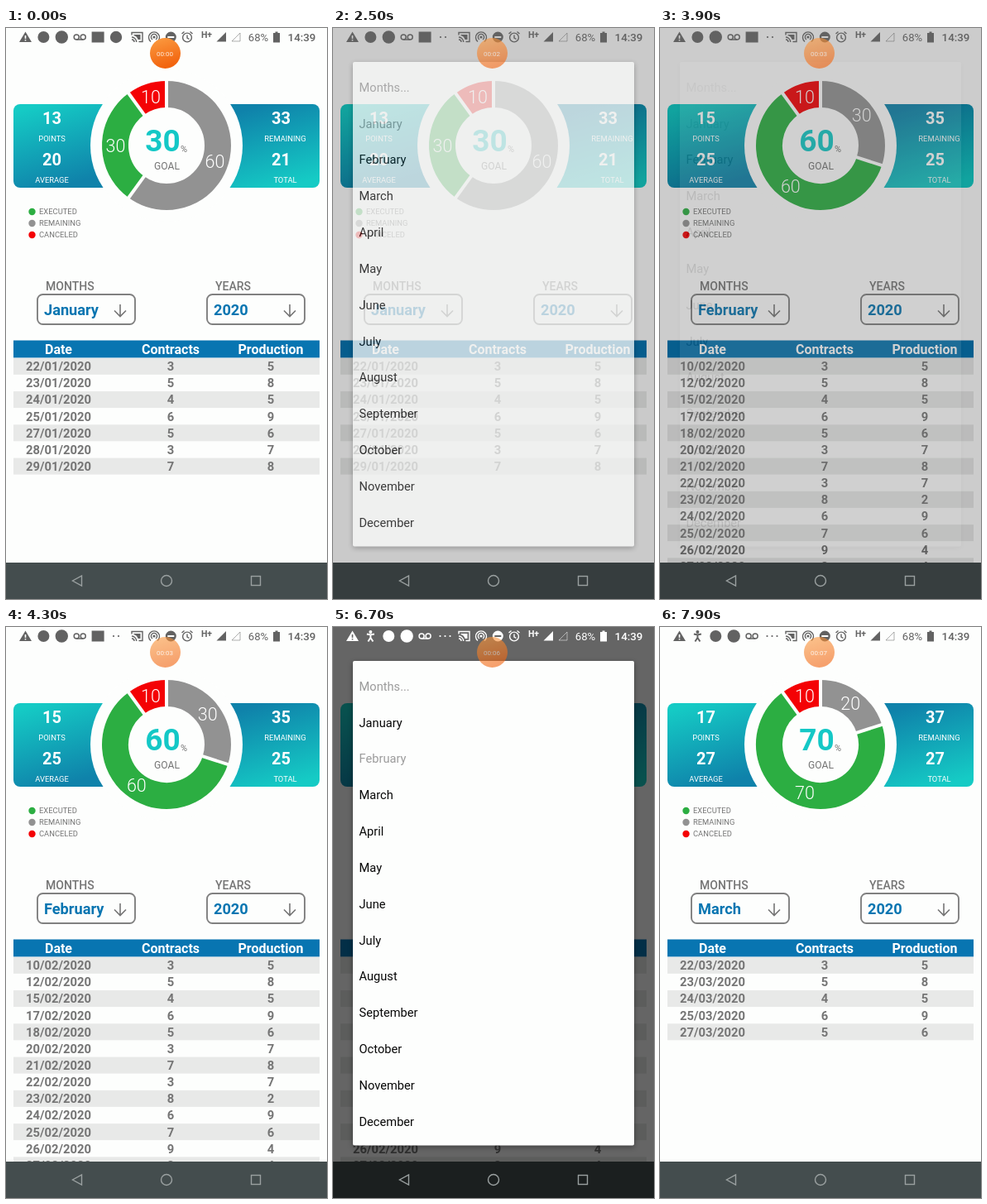
An HTML page for the animation above (8 s loop, 388x690 px).

```html
<!DOCTYPE html>
<html lang="en">
<head>
<meta charset="utf-8">
<title>Goal dashboard</title>
<style>
html, body { margin: 0; height: 100%; overflow: hidden; background: #fdfefd; }
svg { display: block; width: 388px; height: 690px; font-family: Roboto, sans-serif; }
#dialog > rect { filter: drop-shadow(0 2px 3px rgba(0,0,0,.35)); }
</style>
</head>
<body>
<svg id="stage" viewBox="0 0 388 690">
  <defs>
    <linearGradient id="gl" x1="0.1" y1="0" x2="0.45" y2="1">
      <stop offset="0.05" stop-color="#15cbc5"/><stop offset="1" stop-color="#0f82aa"/>
    </linearGradient>
    <linearGradient id="gr" x1="0.45" y1="0" x2="0.8" y2="1">
      <stop offset="0" stop-color="#0f82aa"/><stop offset="0.95" stop-color="#15cbc5"/>
    </linearGradient>
    <linearGradient id="gb" x1="0" y1="0" x2="0.3" y2="1">
      <stop offset="0" stop-color="#fb9d42"/><stop offset="1" stop-color="#f2640f"/>
    </linearGradient>
  </defs>
  <rect width="388" height="690" fill="#fdfefd"/>
  <g id="app"></g>
  <rect y="646" width="388" height="44" fill="#444d4e"/>
  <rect id="dim" width="388" height="690"/>
  <g fill="none" stroke="#9aa0a0" stroke-width="1.4">
    <path d="M91.5 662V674L80.5 668Z"/>
    <circle cx="194" cy="668" r="6.5"/>
    <rect x="296.5" y="662.5" width="11" height="11"/>
  </g>
  <g id="dialog"></g>
  <g id="status"><g id="notes"></g><g id="system"></g></g>
  <g id="bubble">
    <circle cx="192.5" cy="30.5" r="18.5" fill="url(#gb)"/>
    <text id="clock" x="192" y="33.6" font-size="8" fill="#fff" fill-opacity=".85" text-anchor="middle"></text>
  </g>
</svg>
<script>
const LOOP = 8000;
const GRAY = '#757575', BLUE = '#0875b1', TEAL = '#14c8c6';
const NAMES = ['January', 'February', 'March', 'April', 'May', 'June', 'July',
  'August', 'September', 'October', 'November', 'December'];

// shares: remaining, executed, canceled; cards: points, average, remaining, total
// rows: day, contracts, production
const DATA = [
  { shares: [60, 30, 10], cards: [13, 20, 33, 21],
    rows: '22 3 5,23 5 8,24 4 5,25 6 9,27 5 6,28 3 7,29 7 8' },
  { shares: [30, 60, 10], cards: [15, 25, 35, 25],
    rows: '10 3 5,12 5 8,15 4 5,17 6 9,18 5 6,20 3 7,21 7 8,22 3 7,23 8 2,24 6 9,25 7 6,26 9 4,27 3 4' },
  { shares: [20, 70, 10], cards: [17, 27, 37, 27],
    rows: '22 3 5,23 5 8,24 4 5,25 6 9,27 5 6' }
];

const DIALOGS = [{ open: 2340, close: 3700, pick: 0 }, { open: 5900, close: 7250, pick: 1 }];
const SWAPS = [3860, 7410];
const NOTES = [400, 5500];
const TICKS = [600, 1600, 3700, 4600, 5600, 6200, 7200];

const $ = id => document.getElementById(id);
const clamp = v => Math.max(0, Math.min(1, v));
const passed = (times, t) => times.filter(x => t >= x).length;

function text(s, x, y, size, fill, weight = 400, anchor = 'middle') {
  return `<text x="${x}" y="${y}" font-size="${size}" fill="${fill}" font-weight="${weight}" text-anchor="${anchor}">${s}</text>`;
}

function polar(share, r) {
  const a = share / 50 * Math.PI;
  return [194 + r * Math.sin(a), 142 - r * Math.cos(a)];
}

function donut(shares) {
  const colors = ['#929292', '#2cae42', '#f40205'];
  const len = 2 * Math.PI * 62;
  let arcs = '', gaps = '', labels = '', from = 0;
  shares.forEach((n, i) => {
    arcs += `<circle cx="194" cy="142" r="62" fill="none" stroke="${colors[i]}" stroke-width="32"
      stroke-dasharray="${len * n / 100} ${len}" transform="rotate(${from * 3.6 - 90} 194 142)"/>`;
    gaps += `<path d="M${polar(from, 44)}L${polar(from, 80)}" stroke="#fdfefd" stroke-width="4"/>`;
    const [x, y] = polar(from + n / 2, 61.5);
    labels += text(n, x, y + 7.5, 21.5, '#fff', 300);
    from += n;
  });
  return arcs + gaps + labels;
}

function card(x, fill, items) {
  return `<rect x="${x}" y="92" width="120" height="101" rx="8" fill="url(#${fill})"/>` +
    items.map(([s, cx, y, big]) => text(s, cx, y, big ? 20 : 9.4, '#fff', big ? 700 : 400)).join('');
}

function select(x, label, value) {
  return text(label, x + 10, 317, 14, GRAY, 500, 'start') +
    `<rect x="${x}" y="322" width="118" height="36" rx="6.5" fill="none" stroke="#808080" stroke-width="1.9"/>` +
    text(value, x + 8, 347.3, 18.2, BLUE, 700, 'start') +
    `<path d="M${x + 100} 334v14.5m-7 -7l7 7l7 -7" fill="none" stroke="${GRAY}" stroke-width="1.6"/>`;
}

function table(month, rows) {
  const cols = [63.5, 199, 320];
  const line = (cells, y, size, fill) => cells.map((s, i) => text(s, cols[i], y, size, fill, 700)).join('');
  let out = `<rect x="9" y="377.5" width="370" height="21" fill="${BLUE}"/>` +
    line(['Date', 'Contracts', 'Production'], 394.4, 16, '#fff');
  rows.split(',').forEach((row, i) => {
    const [day, a, b] = row.split(' '), y = 409 + i * 20.13;
    if (i % 2 === 0) out += `<rect x="9" y="${y - 10.2}" width="370" height="20" fill="#e8e9e8"/>`;
    out += line([`${day}/0${month + 1}/2020`, a, b], y + 5.2, 14.8, GRAY);
  });
  return out;
}

function drawApp(month) {
  const { shares, cards: c, rows } = DATA[month];
  const legend = [['EXECUTED', '#2cae42'], ['REMAINING', '#929292'], ['CANCELED', '#f40205']];
  $('app').innerHTML =
    card(9, 'gl', [[c[0], 55.5, 116, 1], ['POINTS', 55.5, 136.5], [c[1], 55.5, 166, 1], ['AVERAGE', 55.5, 187]]) +
    card(259, 'gr', [[c[2], 332.5, 116, 1], ['REMAINING', 337.5, 136.5], [c[3], 332.5, 166, 1], ['TOTAL', 337.5, 187]]) +
    '<circle cx="194" cy="142" r="92" fill="#fdfefd"/>' + donut(shares) +
    text(shares[1], 189.5, 148.5, 37, TEAL, 700) +
    text('%', 215, 150, 11, GRAY) + text('GOAL', 194.5, 171.3, 12.1, GRAY) +
    legend.map(([s, f], i) => `<circle cx="31.5" cy="${222 + i * 14}" r="4.2" fill="${f}"/>` +
      text(s, 40, 225.4 + i * 14, 9.4, GRAY, 400, 'start')).join('') +
    select(38, 'MONTHS', NAMES[month]) + select(243, 'YEARS', '2020') + table(month, rows);
}

function drawDialog(pick) {
  $('dialog').innerHTML = '<rect x="24" y="41" width="340" height="585.5" rx="2" fill="#fdfefd"/>' +
    ['Months...', ...NAMES].map((s, i) =>
      text(s, 31.5, 76.8 + i * 43.83, 14.65, i === 0 || i === pick + 1 ? '#9c9c9c' : '#080808', 400, 'start')).join('');
}

// Status icons are drawn around their own centre
const at = (x, s) => `<g transform="translate(${x} 11)">${s}</g>`;
const ICON = {
  warn: '<path fill-rule="evenodd" d="M0 -6.5L7.5 6H-7.5ZM-.8 -2V2H.8V-2ZM-.8 3V4.5H.8V3Z"/>',
  chat: '<circle r="7"/>',
  app: '<circle r="7.7"/>',
  mail: '<rect x="-7.5" y="-6.5" width="15" height="13"/>',
  call: '<circle r="7.2"/>',
  voice: '<path d="M-4 3H4" stroke="currentColor" stroke-width="1.5"/><g fill="none" stroke="currentColor" stroke-width="1.5"><circle cx="-4" r="3"/><circle cx="4" r="3"/></g>',
  person: '<circle cy="-5" r="2"/><path d="M-4.5 -2.5L0 -1.5L4.5 -2.5M0 -2V2L-3 6.5M0 2L3 6.5" fill="none" stroke="currentColor" stroke-width="2"/>',
  dots: n => Array.from({ length: n }, (_, i) => `<circle cx="${i * 6}" r="1.1"/>`).join('')
};

function drawNotes(step) {
  const sets = [
    ['warn', 'chat', 'app', 'voice', 'mail', 'call'],
    ['warn', 'chat', 'app', 'voice', 'mail'],
    ['warn', 'person', 'chat', 'app', 'voice']
  ];
  $('notes').innerHTML = sets[step].map((k, i) => at(23.5 + i * 21.9, ICON[k])).join('') +
    (step ? at(step === 1 ? 130 : 129.5, ICON.dots(step + 1)) : '');
}

function drawSystem() {
  const line = 'fill="none" stroke="currentColor" stroke-width="1.4"';
  const word = (s, x, y, size, w) => text(s, x, y, size, 'currentColor', w);
  $('system').innerHTML =
    at(158.5, `<path d="M-6.5 -2.5V-5.5H6.5V5.5H2M-6.5 0A6 6 0 0 1 -.8 6M-6.5 3A3 3 0 0 1 -3.5 6" ${line}/><path d="M-4 -3H4V3H1A7 7 0 0 0 -4 -2Z"/>`) +
    at(179, `<path d="M-4 5.5A6.5 6.5 0 1 1 4 5.5M-2 3A3.6 3.6 0 1 1 2 3" ${line}/><circle r="1.6"/>`) +
    at(199.3, '<path fill-rule="evenodd" d="M-6.5 0A6.5 6.5 0 1 1 6.5 0A6.5 6.5 0 1 1 -6.5 0ZM-4 -1.1V1.1H4V-1.1Z"/>') +
    at(219, `<circle cy=".5" r="5.4" ${line}/><path d="M0 -2.5V1L2.5 2.5M-6.5 -4L-3.5 -6.5M6.5 -4L3.5 -6.5" ${line}/>`) +
    word('H+', 242.5, 12, 10.5, 700) +
    at(260.5, '<path d="M5.5 -6V5.5H-6Z"/>') +
    at(278, '<path d="M5 -5V5H-5Z" fill="none" stroke="currentColor" stroke-opacity=".5"/>') +
    word('68%', 305, 16, 13.1, 400) +
    at(327, '<path d="M-1.5 -6.5H1.5V-5H4V6.5H-4V-5H-1.5Z"/>') +
    word('14:39', 357.5, 16, 13.3, 500);
}

const last = {};
function once(key, value, draw) {
  if (last[key] !== value) draw(last[key] = value);
}

function render(t) {
  const d = DIALOGS.find(x => t < x.close + 400) || DIALOGS[1];
  const shade = clamp((t - d.open - 60) / 300) * (1 - clamp((t - d.close) / 300));
  const alpha = clamp((t - d.open) / 220) * (1 - clamp((t - d.close) / 220));
  once('month', passed(SWAPS, t), drawApp);
  once('pick', d.pick, drawDialog);
  once('notes', passed(NOTES, t), drawNotes);
  $('dim').setAttribute('opacity', 0.6 * shade);
  $('dialog').setAttribute('opacity', alpha);
  $('dialog').setAttribute('visibility', alpha ? 'visible' : 'hidden');
  const g = Math.round(98 + 157 * clamp((shade - 0.4) / 0.4));
  $('status').setAttribute('color', `rgb(${g},${g},${g})`);
  $('bubble').setAttribute('opacity', 1 - 0.4 * clamp((t - 150) / 600));
  $('clock').textContent = '00:0' + passed(TICKS, t);
}

$('status').setAttribute('fill', 'currentColor');
drawSystem();
function frame() {
  render(performance.now() % LOOP);
  requestAnimationFrame(frame);
}
frame();
</script>
</body>
</html>
```
